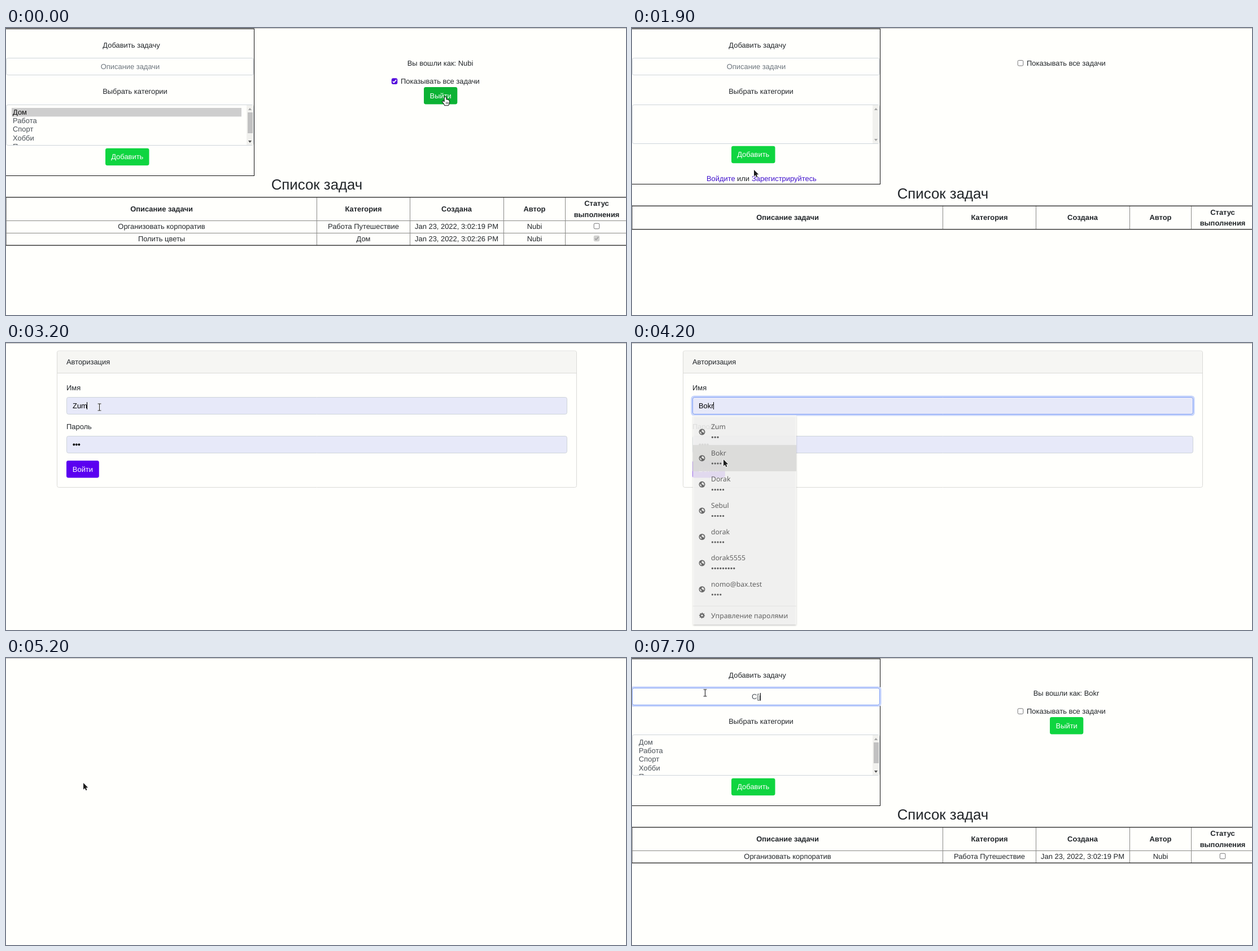
An HTML page with a canvas that plays this animation: 1098 px wide and 510 px high, repeating every 8 s.

```html
<!DOCTYPE html>
<html lang="ru">
<head>
<meta charset="utf-8">
<title>Список задач</title>
<style>
html, body { margin: 0; width: 100%; height: 100%; overflow: hidden; background: #fffffc; }
canvas { display: block; }
</style>
</head>
<body>
<canvas id="stage" width="1098" height="510"></canvas>
<script>
const ctx = document.getElementById('stage').getContext('2d');
const LOOP = 8000, STEP = 100;
const SANS = '"Liberation Sans", Arial, sans-serif';
const UI = '"Noto Sans", "Open Sans", sans-serif';
const BODY = '12.92px ' + SANS;
const PAPER = '#fffffc', INK = '#212529', GREY = '#495057', LINE = '#ced4da';
const GREEN = '#0fd540', VIOLET = '#5a00f0', FILLED = '#e7e9f9';
const OWNER = 'Nubi', GUEST = 'Bokr';
const LOGINS = [['Zum', 3], [GUEST, 4], ['Dorak', 5], ['Sebul', 5],
  ['dorak', 5], ['dorak5555', 9], ['nomo@bax.test', 4]];

// Pointer keys: time, x, y; moves are stepped between keys marked true
const PATH = [
  [0, 778, 122], [700, 778, 124], [800, 778, 125], [1000, 776, 125],
  [1400, 685, 141], [1600, 388, 198], [1800, 290, 228], [1900, 216, 252],
  [2000, 176, 264], [2100, 163, 267], [2400, 160, 271], [2500, 166, 255],
  [2600, 172, 234], [2800, 170, 180], [2900, 167, 136], [3000, 165.5, 114],
  [3800, 164.5, 134], [3900, 163.5, 166], [4000, 162, 194], [4100, 162, 207],
  [4400, 162, 209], [4500, 160, 214], [4600, 158, 219], [4700, 137, 222],
  [5600, 137, 222], [6500, 129.5, 62, true]
];

function pointer(t) {
  let i = 0;
  while (i < PATH.length - 1 && PATH[i + 1][0] <= t) i++;
  const [t0, x, y] = PATH[i], next = PATH[i + 1];
  if (!next || !next[3]) return [x, y];
  const k = (t - t0) / (next[0] - t0), e = k * k * (3 - 2 * k);
  return [x + (next[1] - x) * e, y + (next[2] - y) * e];
}

function text(s, x, y, { align = 'left', color = INK, font = BODY, drop = 4.6 } = {}) {
  ctx.font = font;
  ctx.textAlign = align;
  ctx.fillStyle = color;
  ctx.fillText(s, x, y + drop);
}
const center = (s, x, y, o = {}) => text(s, x, y, { ...o, align: 'center' });

function rect(x, y, w, h, color) {
  ctx.fillStyle = color;
  ctx.fillRect(x, y, w, h);
}

function round(x, y, w, h, r, fill, stroke) {
  ctx.beginPath();
  ctx.roundRect(x, y, w, h, r);
  if (fill) { ctx.fillStyle = fill; ctx.fill(); }
  if (stroke) { ctx.strokeStyle = stroke; ctx.lineWidth = 1; ctx.stroke(); }
}

function poly(points, fill, stroke, width = 1) {
  ctx.beginPath();
  points.forEach(([x, y]) => ctx.lineTo(x, y));
  ctx.closePath();
  if (stroke) { ctx.strokeStyle = stroke; ctx.lineWidth = width; ctx.lineJoin = 'round'; ctx.stroke(); }
  ctx.fillStyle = fill;
  ctx.fill();
}

function dots(x, y, n, pitch, r, color) {
  ctx.fillStyle = color;
  for (let i = 0; i < n; i++) {
    ctx.beginPath();
    ctx.arc(x + pitch * (i + 0.5), y, r, 0, 7);
    ctx.fill();
  }
}

function ring(x, y, w, h, k, color) {
  if (!k) return;
  ctx.globalAlpha = k;
  ctx.strokeStyle = color;
  ctx.lineWidth = 2.6;
  ctx.beginPath();
  ctx.roundRect(x - 1.3, y - 1.3, w + 2.6, h + 2.6, 4.5);
  ctx.stroke();
  ctx.globalAlpha = 1;
}

function field(x, y, w, fill, focus = 0) {
  round(x + 0.5, y + 0.5, w - 1, 30, 3.2, fill, LINE);
  if (!focus) return;
  ring(x, y, w, 31, focus, '#c6d4fc');
  ctx.globalAlpha = focus;
  round(x + 0.5, y + 0.5, w - 1, 30, 3.2, null, '#7f9ff6');
  ctx.globalAlpha = 1;
}

function button(label, x, y, w, color) {
  round(x, y, w, 30.5, 3.4, color);
  center(label, x + w / 2, y + 15, { color: '#fff' });
}

function checkbox(cx, cy, fill, tick) {
  round(cx - 4.8, cy - 4.8, 9.6, 9.6, 2, fill || '#fff', fill || '#767676');
  if (!tick) return;
  ctx.strokeStyle = tick;
  ctx.lineWidth = 1.7;
  ctx.beginPath();
  ctx.moveTo(cx - 3, cy + 0.2);
  ctx.lineTo(cx - 1, cy + 2.3);
  ctx.lineTo(cx + 3.2, cy - 2.6);
  ctx.stroke();
}

function page() {
  rect(0, 0, 1098, 510, PAPER);
  rect(0, 0, 1098, 1, '#b9b9b7');
}

function categories(bottom, full, selected) {
  round(0.5, 136.5, 438, bottom - 136, 3.2, null, LINE);
  ctx.save();
  ctx.beginPath();
  ctx.rect(1, 137, 437, bottom - 137);
  ctx.clip();
  rect(426, 137, 12, bottom - 137, '#f1f1ee');
  poly([[429, 146], [435, 146], [432, 142]], '#a3a3a3');
  const foot = bottom - 8;
  poly([[429, foot], [435, foot], [432, foot + 4]], full ? '#505050' : '#a3a3a3');
  if (full) {
    rect(428, 150, 9, 37, '#c1c1c1');
    if (selected) rect(10, 142, 407, 15.4, '#cecece');
    ['Дом', 'Работа', 'Спорт', 'Хобби', 'Путешествие'].forEach((s, i) =>
      text(s, 12, 149 + 15.4 * i, { color: selected && !i ? '#101010' : GREY }));
  }
  ctx.restore();
}

function table(top, rows) {
  const cols = [0, 550, 715, 881, 990], mids = [275.5, 633, 798, 936, 1046];
  const bottom = top + 42 + rows.length * 22, bold = { font: 'bold ' + BODY };
  cols.forEach(x => rect(x, top, 1, bottom - top, '#8a8a88'));
  rows.forEach((_, i) => rect(0, top + 42 + i * 22, 1098, 1, '#8a8a88'));
  rect(0, top, 1098, 1.5, '#3c3c3c');
  rect(0, bottom - 0.5, 1098, 1.5, '#3c3c3c');
  ['Описание задачи', 'Категория', 'Создана', 'Автор'].forEach((s, i) =>
    center(s, mids[i], top + 21.3, bold));
  center('Статус', mids[4], top + 11.7, bold);
  center('выполнения', mids[4], top + 31, bold);
  rows.forEach(([done, ...cells], i) => {
    const y = top + 52.6 + i * 22;
    cells.forEach((s, j) => center(s, mids[j], y));
    checkbox(mids[4], y - 0.6, done && '#d0d0ce', done && '#a0a0a0');
  });
}

const TASKS = [
  [false, 'Организовать корпоратив', 'Работа Путешествие', 'Jan 23, 2022, 3:02:19 PM', OWNER],
  [true, 'Полить цветы', 'Дом', 'Jan 23, 2022, 3:02:26 PM', OWNER]
];

function todo({ user, all, rows, selected, typed = '', focus = 0, caret, exit = GREEN, exitRing = 0, hover }) {
  page();
  const shift = user ? 0 : 15.5, edge = user ? 262 : 277;
  rect(0, 1, 440, 1, '#111');
  rect(439, 1, 1, edge - 0.5, '#111');
  rect(0, edge, 440, 1, '#111');
  center('Добавить задачу', 222, 30);
  field(0, 53, 439, PAPER, focus);
  if (typed) center(typed, 220, 68.3, { color: GREY });
  else center('Описание задачи', 220, 68.3, { color: '#6c757d' });
  if (caret) {
    ctx.font = BODY;
    rect(Math.floor(220 + ctx.measureText(typed).width / 2 - 0.5), 62, 1, 14, '#222');
  }
  center('Выбрать категории', 228.5, 112.3);
  categories(user ? 208 : 205, !!user, selected);
  button('Добавить', 176, user ? 213.7 : 209.7, 77.5, GREEN);

  if (user) {
    center('Вы вошли как: ' + user, 769, 62.3);
    ring(740, 105, 59, 30.5, exitRing, '#a9e6b8');
    button('Выйти', 740, 105, 59.3, exit);
  } else {
    const link = { color: '#3f10cc' };
    text('Войдите', 132, 267.3, link);
    text('или', 186, 267.3);
    text('Зарегистрируйтесь', 212, 267.3, link);
    if (hover) rect(132, 273, 50.5, 1, link.color);
  }
  const y = user ? 94.6 : 62.3;
  checkbox(688, y, all && '#5208dc', all && '#fff');
  text('Показывать все задачи', 699, y + 0.2);
  center('Список задач', 550.5, 278 + shift, { font: '25.84px ' + SANS, drop: 9.2 });
  table(user ? 300 : 315.5, rows);
}

function login({ name = '', secret = 0, focus = 0, caret, btn = VIOLET, btnRing = 0 }) {
  page();
  const bg = name ? FILLED : PAPER;
  round(90.5, 14, 920, 242.5, 3, PAPER, '#dadad7');
  round(91, 14.5, 919, 39, [3, 3, 0, 0], '#f6f6f3');
  rect(91, 53, 919, 1, '#dadad7');
  text('Авторизация', 107, 33.4);
  text('Имя', 107, 79.3);
  text('Пароль', 107, 148.8);
  field(107, 96, 887, bg, focus);
  field(107, 165, 887, bg);
  text(name, 118, 111, { color: '#000' });
  dots(118, 180.5, secret, 4.55, 1.9, '#000');
  if (caret) {
    ctx.font = BODY;
    rect(Math.floor(118 + ctx.measureText(name).width), 105, 1, 13, '#000');
  }
  ring(107, 209, 58, 30.5, btnRing, '#c3a8fa');
  button('Войти', 107, 209, 57.8, btn);
}

function globe(x, y) {
  ctx.fillStyle = '#555';
  ctx.beginPath();
  ctx.arc(x, y, 5.5, 0, 7);
  ctx.fill();
  poly([[x - 4.2, y - 1.2], [x - 1.2, y + 1.2], [x - 0.8, y + 4], [x - 3.4, y + 2.4]], '#fafaf8');
  poly([[x + 0.2, y - 4], [x + 3.2, y - 2.4], [x + 4, y + 1.6], [x + 1.6, y + 0.6], [x - 1, y - 1]], '#fafaf8');
}

function gear(x, y) {
  const pts = [];
  for (let i = 0; i < 32; i++) {
    const r = i % 4 < 2 ? 5.2 : 3.9, a = i * Math.PI / 16;
    pts.push([x + r * Math.cos(a), y + r * Math.sin(a)]);
  }
  poly(pts, '#555');
  dots(x - 0.5, y, 1, 1, 1.7, '#fafaf8');
}

function popup(alpha, active) {
  ctx.globalAlpha = alpha;
  ctx.save();
  ctx.shadowColor = 'rgba(0,0,0,.35)';
  ctx.shadowBlur = 3;
  ctx.shadowOffsetY = 1;
  rect(107.5, 128.5, 183.5, 372, '#fafaf8');
  ctx.restore();
  if (active >= 0) rect(107.5, 134.7 + 46.6 * active, 183.5, 46.6, '#d9d9d7');
  const font = '12.2px ' + UI, color = '#4c4c4c';
  LOGINS.forEach(([name, n], i) => {
    const y = 148.5 + 46.6 * i;
    globe(124, y + 9.6);
    text(name, 140, y, { font, color });
    dots(140, y + 19, n, 4.8, 1.65, color);
  });
  rect(107.5, 467, 183.5, 1, '#e2e2e0');
  gear(124, 484.3);
  text('Управление паролями', 140, 484.3, { font, color });
  ctx.globalAlpha = 1;
}

function status(alpha) {
  ctx.globalAlpha = alpha;
  round(-4, 496.5, 219.5, 20, 3, '#f6f6f3', '#dcdcda');
  text('teststand:7070/lab7q_plan/entry.html', 3, 505, { font: '11.7px ' + UI, color: '#777' });
  ctx.globalAlpha = 1;
}

function arrow(x, y) {
  const p = [[0, 0], [0, 11.8], [2.7, 9.3], [4.5, 13.2], [6.4, 12.4], [4.7, 8.6], [8.2, 8.3]];
  poly(p.map(([a, b]) => [x + a, y + b]), '#1c1c1c', '#fff', 1.6);
}

function hand(x, y) {
  const p = [[-1.3, 1.2], [0, 0.4], [1.3, 1.2], [1.4, 5.2], [4.4, 5.8], [7, 7.2], [6.8, 11.6],
    [5.3, 15.2], [-0.8, 15.2], [-2.6, 12], [-5, 9.2], [-4.2, 8], [-1.3, 9.6]];
  poly(p.map(([a, b]) => [x + a, y + b]), '#fff', '#111', 2);
  [1.4, 3.2, 5].forEach(d => rect(x + d - 0.3, y + 9.4, 0.8, 3.6, '#333'));
}

function beam(x, y) {
  for (const [w, c] of [[2.6, 'rgba(255,255,255,.8)'], [1.1, '#222']]) {
    ctx.strokeStyle = c;
    ctx.lineWidth = w;
    ctx.beginPath();
    for (const s of [-1, 1]) {
      ctx.moveTo(x - 3, y + 6 * s);
      ctx.lineTo(x + 3, y + 6 * s);
    }
    ctx.moveTo(x, y - 6);
    ctx.lineTo(x, y + 6);
    ctx.stroke();
  }
}

function scene(t) {
  const [x, y] = pointer(t);
  let cursor = arrow;
  if (t < 1000) {
    todo({ user: OWNER, all: true, rows: TASKS, selected: true,
      exit: t < 200 ? '#0cb234' : '#0bae32', exitRing: t < 700 ? 0 : t < 800 ? 0.5 : 1 });
    cursor = hand;
  } else if (t < 2400) {
    const hover = t >= 2100;
    todo({ rows: [], hover });
    if (t >= 2300) status(1);
    if (hover) cursor = hand;
  } else if (t < 5200) {
    const pick = t < 3800 ? -1 : t < 4000 ? 0 : 1;
    const [name, secret] = t < 3200 ? ['', 0] : LOGINS[Math.max(pick, 0)];
    const focus = t < 3300 ? 0 : t < 3500 ? 0.6 : t < 4900 ? 1 : t < 5000 ? 0.5 : 0;
    const over = t >= 4600;
    login({ name, secret, focus, caret: t >= 3200 && t < 4900,
      btn: t >= 4900 ? '#4400b8' : over ? '#4c00cc' : VIOLET,
      btnRing: t < 4900 ? 0 : t < 5000 ? 0.5 : 1 });
    if (t < 2600) status(t < 2500 ? 1 : 0.5);
    if (t >= 3300 && t < 4400) popup(t < 4200 ? 1 : t < 4300 ? 0.87 : 0.35, pick);
    if (over) cursor = hand;
    else if (t < 3800 && (y < 126 || (y > 165 && y < 196))) cursor = beam;
  } else if (t < 5400) {
    page();
  } else {
    const typed = 'C[j'.slice(0, t < 7300 ? 0 : t < 7500 ? 1 : t < 7700 ? 2 : 3);
    todo({ user: GUEST, rows: TASKS.slice(0, 1), typed,
      focus: t < 6600 ? 0 : t < 6900 ? 0.6 : 1,
      caret: (t >= 6600 && t < 7100) || t >= 7300 });
    if (y < 84) cursor = beam;
  }
  cursor(x, y);
}

const start = performance.now();
ctx.textRendering = 'geometricPrecision';
function tick() {
  const t = (performance.now() - start) % LOOP;
  scene(Math.floor(t / STEP) * STEP);
  requestAnimationFrame(tick);
}
tick();
</script>
</body>
</html>
```
